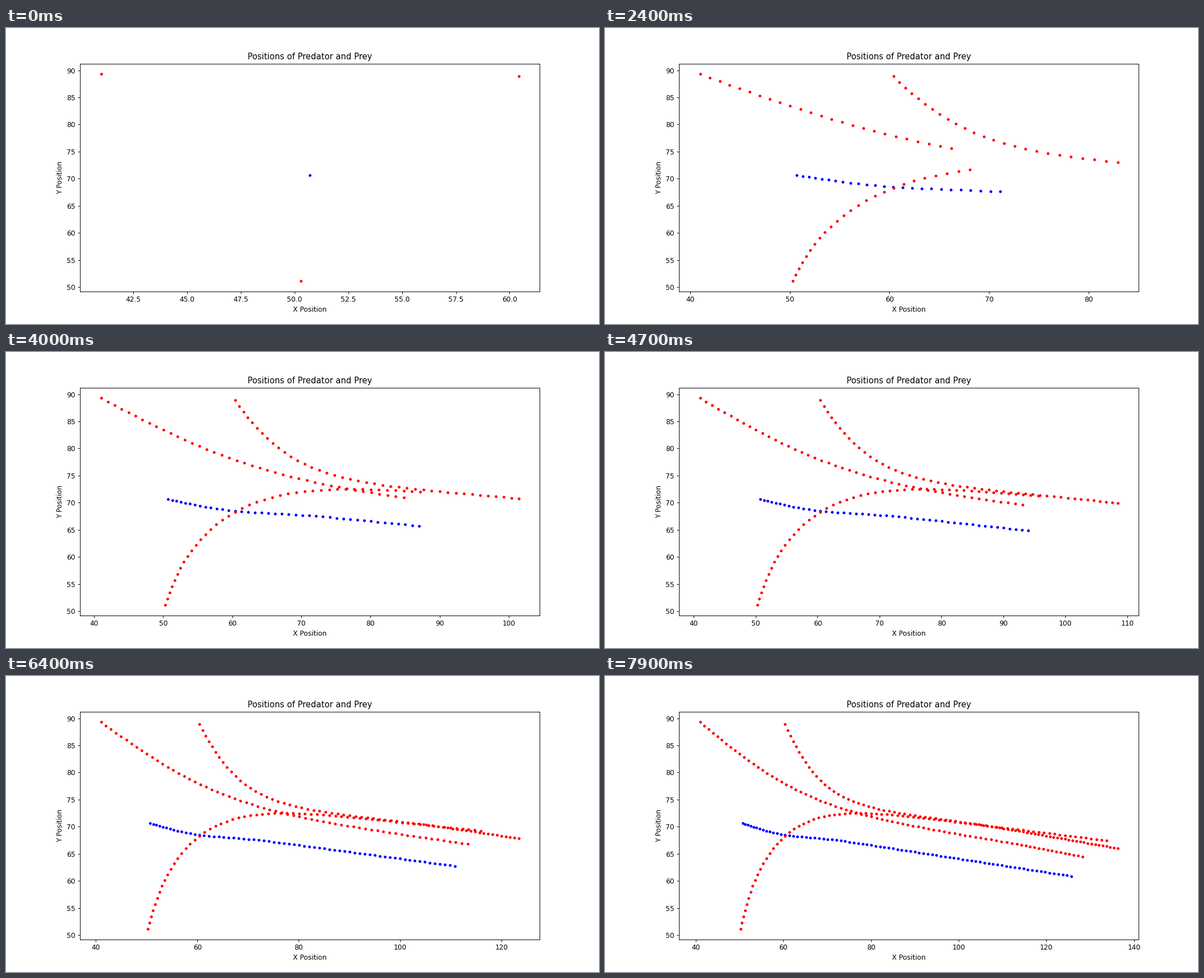
Write a matplotlib script that moves like this. It is 1058 by 529 pixels and loops after 8 s.

```python
import numpy as np
import matplotlib.pyplot as plt
from matplotlib.animation import FuncAnimation

STEPS = 80
MID_STEP = np.arange(STEPS - 1) + 0.5


def eased(start, *changes):
    """A value over time; each change is (amount, middle step, width)."""
    value = np.full(STEPS - 1, float(start))
    for amount, middle, width in changes:
        value += amount / (1 + np.exp((middle - MID_STEP) / width))
    return value


def track(x, y, speed, climb):
    """Walk right from (x, y); climb is the vertical part of the speed."""
    velocity = np.column_stack([np.sqrt(speed ** 2 - climb ** 2), climb])
    return np.vstack([[x, y], [x, y] + np.cumsum(velocity, axis=0)])


def padded(values):
    low, high = values.min(), values.max()
    pad = 0.05 * (high - low)
    return low - pad, high + pad


prey = track(50.72, 70.69,
             speed=eased(0.59, (0.41, 7.8, 3.2)),
             climb=eased(-0.18, (0.13, 13, 1.8), (-0.074, 23, 2.5)))
left = track(41.0, 89.33,
             speed=eased(1.2, (-0.195, 64, 0.3)),
             climb=eased(-0.715, (0.56, 22, 8)))
right = track(60.43, 88.88,
              speed=eased(1.2, (-0.33, 42.2, 3.6)),
              climb=eased(-1.095, (0.973, 13.4, 4.3)))
low = track(50.28, 51.14,
            speed=eased(1.2),
            climb=eased(1.195, (-1.315, 19.5, 5.2)))
paths = [prey, left, right, low]

fig, ax = plt.subplots(figsize=(12, 6), dpi=1058 / 12)
fig.subplots_adjust(top=0.8799)
ax.set_title("Positions of Predator and Prey")
ax.set_xlabel("X Position")
ax.set_ylabel("Y Position")
trails = [ax.plot([], [], style)[0] for style in ("b.", "r.", "r.", "r.")]


def update(step):
    seen = [path[:step + 1] for path in paths]
    for trail, part in zip(trails, seen):
        trail.set_data(part[:, 0], part[:, 1])
    everything = np.concatenate(seen)
    ax.set_xlim(*padded(everything[:, 0]))
    ax.set_ylim(*padded(everything[:, 1]))
    return trails


anim = FuncAnimation(fig, update, frames=STEPS, interval=100,
                     repeat=True, repeat_delay=0)
plt.show()
```
